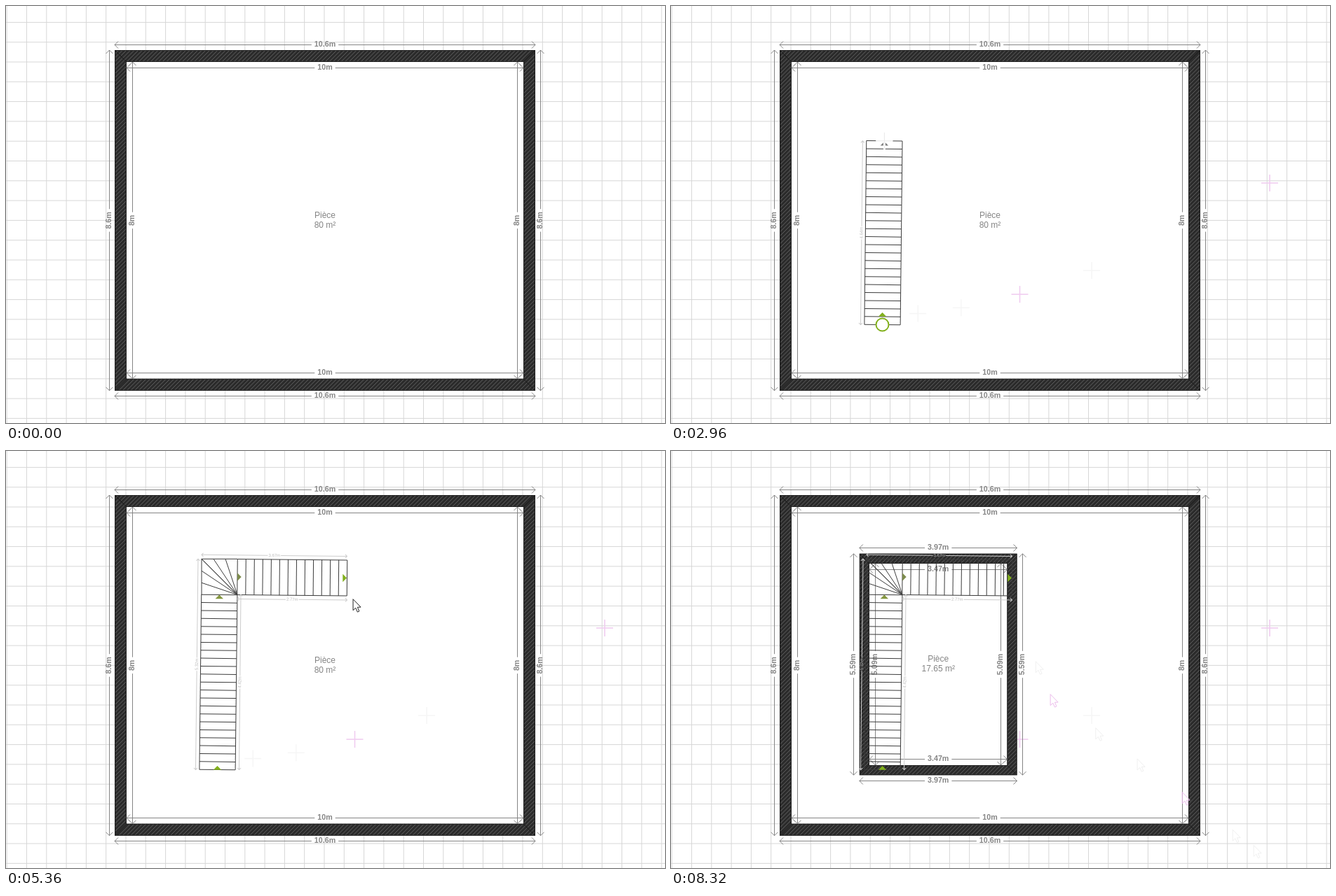
These frames come from a looping animation (940x596 px, 8640 ms). An HTML page with a canvas:

```html
<!DOCTYPE html>
<html lang="fr">
<head>
<meta charset="utf-8">
<style>
  html, body { margin: 0; width: 100%; height: 100%; overflow: hidden; background: #fff; }
  canvas { display: block; }
</style>
</head>
<body>
<canvas id="plan" width="940" height="596"></canvas>
<script>
const ctx = document.getElementById('plan').getContext('2d');
const LOOP = 8640, STEP = 80;
const METRE = 56.6, CELL = 28.3, HALF = 25.6;
const GREEN = '#82b01c', INK = '#3c3c3c', GRAY = '#858585', PINK = '#f0cdf0', PALE = '#f6f6f6';
const RIGHT = 0, DOWN = Math.PI / 2, LEFT = Math.PI, UP = -DOWN;
const START = [301.5, 455.5], CORNER = [304.5, 180], END = [486.5, 181.5];

const easeOut = power => k => 1 - (1 - k) ** power;
const smooth = k => k * k * (3 - 2 * k);

// Position at time t along a start point followed by eased moves.
function follow(t, from, moves) {
  for (const { start, end, to, easeX, easeY = easeX } of moves) {
    if (t <= start) break;
    const k = Math.min(1, (t - start) / (end - start)), [x, y] = from;
    from = [x + (to[0] - x) * easeX(k), y + (to[1] - y) * easeY(k)];
  }
  return from;
}
const crossAt = t => follow(t, [854, 253], [
  { start: 1120, end: 1600, to: [322, 441], easeX: easeOut(1.6), easeY: easeOut(2.7) },
  { start: 1600, end: 1680, to: START, easeX: smooth },
  { start: 2240, end: 3120, to: CORNER, easeX: easeOut(1.8) },
  { start: 3440, end: 4080, to: END, easeX: easeOut(1.7) }
]);
const pointerAt = t => follow(t, [486, 181], [
  { start: 5280, end: 6080, to: [531, 340], easeX: easeOut(2) },
  { start: 7520, end: 8320, to: [875, 596], easeX: smooth }
]);

function path(points, { stroke, fill, width = 1, close = false }) {
  ctx.beginPath();
  points.forEach(p => ctx.lineTo(...p));
  if (close) ctx.closePath();
  if (fill) { ctx.fillStyle = fill; ctx.fill(); }
  if (stroke) { ctx.strokeStyle = stroke; ctx.lineWidth = width; ctx.stroke(); }
}
const line = (x1, y1, x2, y2, stroke, width) => path([[x1, y1], [x2, y2]], { stroke, width });

function local(x, y, angle, draw) {
  ctx.save();
  ctx.translate(x, y);
  ctx.rotate(angle);
  draw();
  ctx.restore();
}

function label(text, x, y, font, color) {
  ctx.font = font + ' "Liberation Sans", Arial, sans-serif';
  ctx.fillStyle = color;
  ctx.textAlign = 'center';
  ctx.textBaseline = 'middle';
  ctx.fillText(text, x, y);
}

function dimension(x1, y1, x2, y2, small) {
  const length = Math.hypot(x2 - x1, y2 - y1), mid = length / 2;
  const color = small ? '#cccccc' : GRAY, head = small ? 2.5 : 5;
  const metres = (length / METRE).toFixed(2);
  local(x1, y1, Math.atan2(y2 - y1, x2 - x1), () => {
    const text = (small ? metres : +metres) + 'm';
    label(text, mid, 0, small ? '6px' : 'bold 10.7px', small ? '#bbbbbb' : GRAY);
    const gap = ctx.measureText(text).width / 2 + (small ? 1 : 4);
    if (mid > gap) {
      line(0, 0, mid - gap, 0, color);
      line(mid + gap, 0, length, 0, color);
    }
    path([[head, -head], [0, 0], [head, head]], { stroke: color });
    path([[length - head, -head], [length, 0], [length - head, head]], { stroke: color });
  });
}

function triangle(x, y, angle, fill) {
  local(x, y, angle, () => path([[0, 0], [-5.7, -5.7], [-5.7, 5.7]], { fill, close: true }));
}

function grid() {
  for (let x = 1.2; x < 940; x += CELL) line(x, 0, x, 596, '#d7d7d7');
  for (let y = 23.4; y < 596; y += CELL) line(0, y, 940, y, '#d7d7d7');
}

// A walled room centred on (cx, cy); all sizes in metres.
function room(cx, cy, width, height, wall, area) {
  const box = margin => {
    const w = width * METRE / 2 + margin, h = height * METRE / 2 + margin;
    return [cx - w, cy - h, cx + w, cy + h];
  };
  const [l, t, r, b] = box(wall * METRE), [il, it, ir, ib] = box(0);
  ctx.fillStyle = '#fff';
  ctx.fillRect(l, t, r - l, b - t);
  ctx.save();
  ctx.beginPath();
  ctx.rect(l, t, r - l, b - t);
  ctx.rect(il, it, ir - il, ib - it);
  ctx.fillStyle = '#2b2b2b';
  ctx.fill('evenodd');
  ctx.clip('evenodd');
  for (let x = l; x < r + b - t; x += CELL / 5) line(x, t, x - (b - t), b, '#686868', .9);
  for (const [x, ix] of [[l, il], [r, ir]])
    for (const [y, iy] of [[t, it], [b, ib]]) line(x, y, ix, iy, '#1c1c1c');
  ctx.strokeStyle = '#222';
  ctx.lineWidth = 2;
  ctx.strokeRect(l, t, r - l, b - t);
  ctx.strokeRect(il, it, ir - il, ib - it);
  ctx.restore();

  const pixel = v => Math.floor(v) + .5;
  for (const [offset, [x1, y1, x2, y2]] of [[8, box(wall * METRE)], [-8.5, box(0)]]) {
    for (const y of [y1 - offset, y2 + offset]) dimension(x1, pixel(y), x2, pixel(y));
    for (const x of [x1 - offset, x2 + offset]) dimension(pixel(x), y2, pixel(x), y1);
  }
  label('Pièce', cx, cy - 7, '12px', GRAY);
  label(area, cx, cy + 7, '12px', GRAY);
}

function flight([x1, y1], [x2, y2], tread) {
  const length = Math.hypot(x2 - x1, y2 - y1), count = Math.max(1, Math.round(length / tread));
  local(x1, y1, Math.atan2(y2 - y1, x2 - x1), () => {
    for (let i = 0; i <= count; i++) line(length * i / count, -HALF, length * i / count, HALF, INK);
    for (const side of [-HALF, HALF]) line(0, side, length, side, INK);
  });
}

function straightStairs([x, y], done) {
  if (START[1] - y < 4) return;
  flight(START, [x, y], 11.5);
  dimension(START[0] - 31, START[1], x - 31, y, true);
  triangle(START[0], 450, UP, GREEN);
  if (!done) triangle(x, y + 1, UP, '#7a7a7a');
}

function turningStairs(endX, done) {
  const left = 279, top = 154.3, right = 330, bottom = 205.5;
  const endY = CORNER[1] + (endX - right) * .0095;
  flight(START, [304.3, bottom], 11.4);
  flight([right, CORNER[1]], [endX, endY], 12);
  path([[left, bottom], [left, top], [right, top]], { stroke: INK });
  for (let i = 0; i < 3; i++) {
    line(right, bottom, left, top + i * 17, INK);
    line(right, bottom, left + i * 17, top, INK);
  }
  dimension(START[0] - 31, START[1], left - 5, top, true);
  dimension(START[0] + 31, START[1], right + 5, bottom, true);
  dimension(left, top - 6, endX, endY - 31, true);
  dimension(right, bottom + 6, endX, endY + 31.5, true);
  triangle(START[0], 450, UP, GREEN);
  triangle(304.3, bottom, UP, '#84963f');
  triangle(right + 5.7, CORNER[1], RIGHT, '#7d8b4d');
  triangle(endX - .5, endY, RIGHT, done ? GREEN : '#7a7a7a');
}

function arrows(x, y, angles) {
  for (const a of angles) triangle(x + 17.5 * Math.cos(a), y + 17.5 * Math.sin(a), a, GREEN);
}

function disc(x, y, radius, fill, stroke) {
  ctx.beginPath();
  ctx.arc(x, y, radius, 0, 7);
  ctx.fillStyle = fill;
  ctx.fill();
  if (stroke) { ctx.strokeStyle = stroke; ctx.lineWidth = 2; ctx.stroke(); }
}

function ring([x, y], angles) {
  disc(x, y, 9, '#fff', GREEN);
  arrows(x, y, angles);
}

function tick(x, y, size, stroke, width) {
  path([[x - size, y], [x - size / 3, y + size * .65], [x + size, y - size * .75]], { stroke, width });
}

function confirmHandle([x, y], angles) {
  arrows(x, y, angles);
  disc(x, y, 10.5, '#71755f');
  tick(x, y, 6.5, '#fff', 3.4);
}

function tickCursor([x, y]) {
  tick(x - 1.5, y + 20.5, 7, '#111', 6.2);
  tick(x - 1.5, y + 20.5, 6, '#fff', 3.6);
}

function cross([x, y], stroke, width) {
  line(x - 12, y, x + 12, y, stroke, width);
  line(x, y - 12, x, y + 12, stroke, width);
}

function pointer([x, y], stroke, fill) {
  const shape = [[0, 0], [0, 16], [3.7, 12.6], [6.3, 18.4], [8.8, 17.3], [6.3, 11.6], [11, 11.4]];
  path(shape.map(([dx, dy]) => [x + .5 + dx, y + .5 + dy]), { stroke, fill, close: true });
}

// Cursors leave faint marks where they passed at the given times.
function trail(t, times, mark) {
  for (const time of times) if (t > time) mark(time);
}

function draw(t) {
  const during = (from, to) => t >= from && t < to;
  ctx.fillStyle = '#fff';
  ctx.fillRect(0, 0, 940, 596);
  grid();
  room(455, 306.4, 10, 8, .3, '80 m²');
  trail(t, [1120, 1360], time => cross(crossAt(time), PINK, 1.6));
  trail(t, [1280, 1440, 1520], time => cross(crossAt(time), PALE, 1.6));
  if (t >= 6880) room(381.2, 305, 3.47, 5.09, .25, '17.65 m²');

  const aim = crossAt(t);
  if (t >= 3600) turningStairs(aim[0], t >= 4480);
  else if (t >= 2320) straightStairs(t < 3120 ? aim : CORNER, t >= 3280);

  if (during(2240, 3280)) ring(START, t < 2320 ? [RIGHT, DOWN, LEFT, UP] : [UP]);
  if (during(3280, 3600)) confirmHandle(CORNER, [LEFT, RIGHT]);
  if (during(3600, 4480)) ring(CORNER, [RIGHT]);
  if (during(4480, 5040)) confirmHandle(END, [UP, DOWN]);

  if (during(1120, 3280) || during(3520, 4480)) {
    cross(aim, '#fff', 3);
    cross(aim, t < 1440 ? PINK : '#e8e8e8', 1);
  }
  if (during(3280, 3600) || during(4480, 5040)) tickCursor(aim);

  trail(t, [5680, 7760, 7860, 8080, 8140], time => pointer(pointerAt(time), '#f0f0f0'));
  trail(t, [7600, 7960], time => pointer(pointerAt(time), '#ecbcec'));
  if (during(5040, 8320)) pointer(pointerAt(t), '#222', '#fff');
}

let shown = -1;
function frame() {
  const t = Math.floor(performance.now() % LOOP / STEP) * STEP;
  if (t !== shown) draw(shown = t);
  requestAnimationFrame(frame);
}
frame();
</script>
</body>
</html>
```
